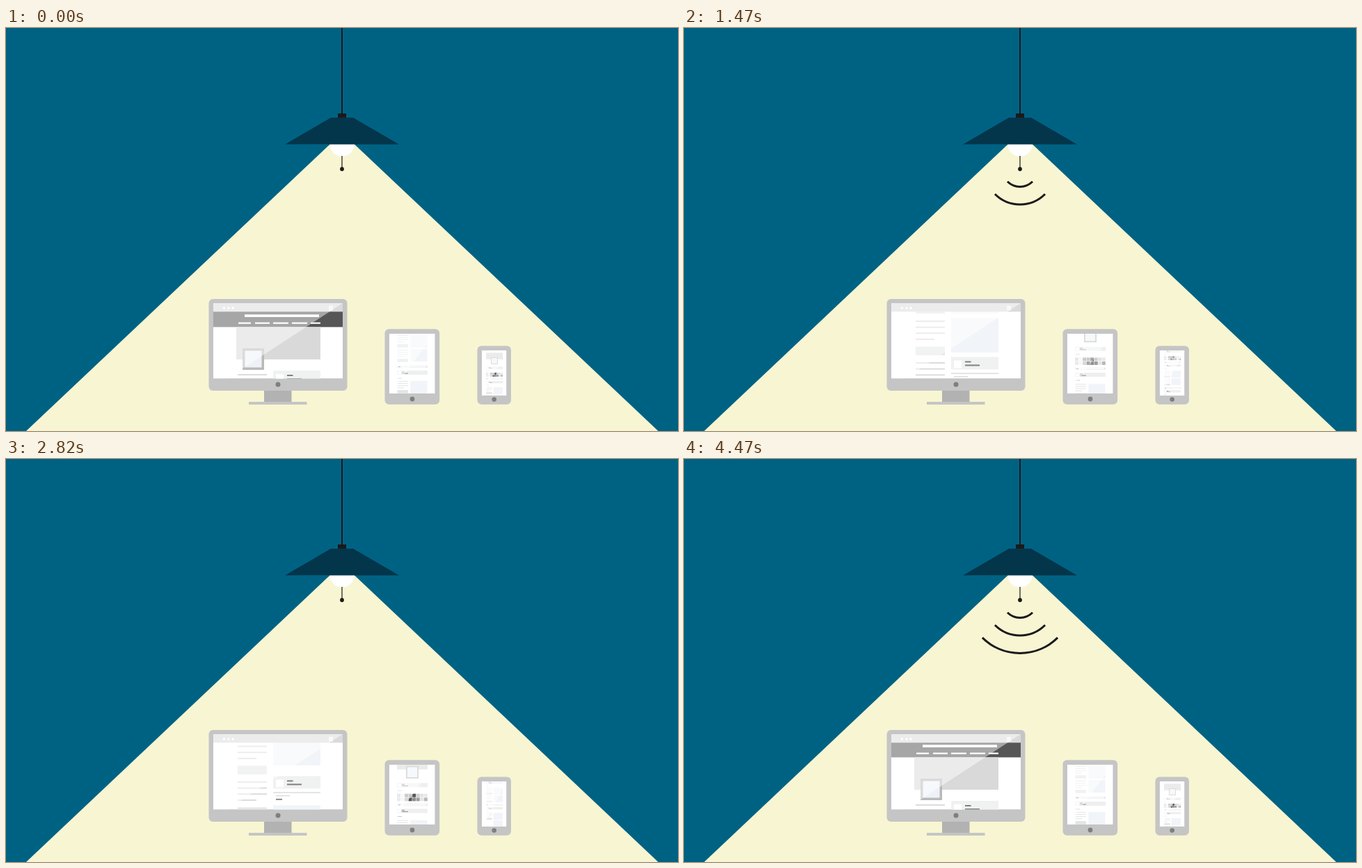
An HTML page with a canvas that plays this animation: 966x580 px, repeating every 4740 ms.

```html
<!DOCTYPE html>
<html lang="en">
<head>
<meta charset="utf-8">
<title>Lamp and devices</title>
<style>
  html, body { margin: 0; width: 100%; height: 100%; overflow: hidden; background: #006283; }
  canvas { display: block; }
</style>
</head>
<body>
<canvas id="stage" width="966" height="580"></canvas>
<script>
const ctx = document.getElementById('stage').getContext('2d');
const LOOP = 4740, STEP = 30, LAST = 149;
const INK = '#1a1a1a', BODY = '#c5c5c5', DARK = '#565656', LINE = '#dcdcdc', PICTURE = '#f1f4f8';
const SWATCHES = ['#b2b2b2', '#f1f3f4', '#9c9c9c', '#9c9c9c', DARK, '#d9d9d9', '#d9d9d9', '#f1f2f2', '#b2b2b2'];
const STRIP = [
  '#d4d4d4', '#f0f0f0', '#9c9c9c', '#9c9c9c', DARK, '#d0d0d0', '#e2e2e2', '#e9e9e9',
  '#d9d9d9', '#eeeeee', '#b2b2b2', DARK, '#8c8c8c', '#9c9c9c', '#e4e4e4', '#b8b8b8'
];

function rect(color, x, y, w, h) {
  ctx.fillStyle = color;
  ctx.fillRect(x, y, w, h);
}

function disc(color, x, y, r) {
  ctx.fillStyle = color;
  ctx.beginPath();
  ctx.arc(x, y, r, 0, 7);
  ctx.fill();
}

function poly(color, ...points) {
  ctx.fillStyle = color;
  ctx.beginPath();
  points.forEach(([x, y]) => ctx.lineTo(x, y));
  ctx.fill();
}

function rounded(color, x, y, w, h, r) {
  ctx.fillStyle = color;
  ctx.beginPath();
  ctx.roundRect(x, y, w, h, r);
  ctx.fill();
}

function cells(colors, columns, x, y, pitchX, pitchY, w, h) {
  colors.forEach((color, i) =>
    rect(color, x + i % columns * pitchX, y + Math.floor(i / columns) * pitchY, w, h));
}

function avatar(x, y, size, border) {
  rect('#b9b9b9', x, y, size, size);
  rect('#eef2f7', x + border, y + border, size - 2 * border, size - 2 * border);
}

// Clips a screen, draws its content and lays the diagonal shine over it.
function screen(x, y, w, h, shineX, content) {
  ctx.save();
  ctx.beginPath();
  ctx.rect(x, y, w, h);
  ctx.clip();
  rect('#fff', x, y, w, h);
  content();
  poly('rgba(255,255,255,.47)', [x, y], [x + w, y], [shineX, y + h], [x, y + h]);
  ctx.restore();
}

function lamp(waves) {
  rect('#006283', 0, 0, 966, 580);
  poly('#f8f5d2', [466, 167], [500.5, 167], [937.5, 580], [29, 580]);
  rect(INK, 482, 0, 2, 124);
  rect(INK, 477, 123, 12, 7);
  disc('#fff', 483, 167, 17.8);
  poly('#03354b', [467, 129], [499, 129], [565, 167.5], [401, 167.5]);
  poly('#006283', [401, 167.5], [465.5, 167.5], [464, 169]);
  rect(INK, 482.4, 184, 1.2, 19);
  disc(INK, 483, 203, 2.9);
  ctx.strokeStyle = INK;
  ctx.lineWidth = 3;
  for (let i = 1; i <= waves; i++) {
    ctx.beginPath();
    ctx.arc(483, 203, 25.5 * i, Math.PI / 4, Math.PI * 3 / 4);
    ctx.stroke();
  }
}

function textLines(y, count = 4) {
  for (let i = 0; i < count; i++) rect(LINE, 333, y + i * 8.7, i === 3 ? 27 : 42, 2);
}

function wideCard(y) {
  rect('#f0f1f1', 384, y, 68, 18);
  rect('#fff', 388, y + 5, 11, 11);
  rect('#808080', 404, y + 6, 8.5, 2);
  rect('#808080', 404, y + 11, 21, 2);
  rect(LINE, 384, y + 23, 68, 1.5);
  rect(LINE, 388, y + 27.5, 20, 1.5);
  rect('#8c8c8c', 388, y + 32.5, 9, 2);
}

function widePage() {
  rect(DARK, 298, 408, 186, 22.4);
  rect('#fff', 343, 412.3, 107, 3.7);
  [[334, 18], [358, 21], [384, 22], [411, 22], [438, 14]]
    .forEach(([x, w]) => rect('#fff', x, 423.6, w, 2.2));
  rect('#d9d9d9', 331, 430.4, 121, 46.6);
  avatar(340, 461, 31, 3.5);

  textLines(498);
  cells(SWATCHES, 3, 333, 550, 15.5, 14.6, 14, 13.7);
  textLines(602.5);
  for (let y = 641; y < 960; y += 60) {
    rect('#e4e7e7', 333, y, 42, 12.5);
    textLines(y + 22.5);
  }

  [493, 562, 716, 896].forEach(wideCard);
  [604, 660, 831, 938].forEach(y => rect(PICTURE, 384, y, 68, 49.5));
  cells(SWATCHES, 3, 384, 757, 23.1, 22.3, 20.6, 20.5);
}

function monitor(scroll) {
  rect('#b2b2b2', 371, 521, 39.5, 18);
  rect(BODY, 349, 538, 83.5, 4);
  rounded(BODY, 291.5, 390, 199, 132, 6);
  disc('#7f7f7f', 391, 513, 3.5);
  screen(298, 396, 186, 108.5, 318, () => {
    ctx.translate(0, -scroll);
    widePage();
    ctx.translate(0, scroll);
    rect('#dadada', 298, 396, 186, 12.3);
    [313.5, 320, 326].forEach(x => disc('#fff', x, 403, 1.7));
    [400, 402.4, 404.8].forEach(y => rect('#fff', 464, y, 6, 1.5));
  });
}

function narrowCard(y) {
  rect('#eeefef', 562, y, 44, 6);
  rect('#fff', 563.5, y + 1.5, 4, 3.5);
  rect('#8c8c8c', 569, y + 1.6, 4, 1);
  rect('#8c8c8c', 569, y + 3.6, 9, 1);
  rect('#c8c8c8', 563, y + 10.5, 6, 1);
}

function narrowRow(y) {
  rect('#e8e9e9', 562, y, 44, 3);
  rect('#fff', 567, y + 0.8, 37, 1.4);
  rect('#8c8c8c', 564, y + 1, 3, 1);
}

function narrowPage(withHeader) {
  if (withHeader) {
    rect(DARK, 551, 440.5, 66, 7.7);
    rect('#fff', 566, 442.3, 39, 1.4);
    for (let i = 0; i < 5; i++) rect('#fff', 562.5 + i * 9, 445.7, 7, 1);
  }
  rect('#d9d9d9', 562, 448, 44, 17);
  avatar(575, 460, 18, 1.8);
  [484.5, 521.7, 589].forEach(narrowCard);
  cells(STRIP, 8, 562, 500, 5.55, 5.6, 5, 5);
  [514.5, 582].forEach(narrowRow);
  [538, 558, 604, 624].forEach(y => rect(PICTURE, 581.5, y, 24, 18));
  for (const y of [538, 559, 604]) {
    for (let i = 0; i < 4; i++) rect('#e4e4e4', 562.5, y + i * 3.1, i === 3 ? 10 : 15.5, 1);
    rect('#e2e5e5', 562.5, y + 13.2, 15.5, 4.5);
  }
}

function tablet(scroll) {
  rounded(BODY, 544.5, 433.3, 78.7, 108.5, 6);
  disc('#7f7f7f', 584, 534, 3.4);
  screen(551, 440, 65.7, 86, 552, () => {
    ctx.translate(0, -scroll);
    narrowPage(true);
    ctx.translate(0, scroll);
  });
}

function phone(scroll) {
  rounded(BODY, 677.5, 457.5, 48.5, 84.3, 6);
  disc('#7f7f7f', 701.7, 534.6, 3.3);
  screen(684, 464, 35.5, 65, 686, () => {
    ctx.save();
    ctx.translate(690, 496 - scroll);
    ctx.scale(0.55, 0.55);
    ctx.translate(-562, -500);
    narrowPage(false);
    ctx.restore();
  });
}

function draw(now) {
  const n = Math.min(LAST, Math.floor(now % LOOP / STEP));
  lamp(n ? Math.floor((n - 1) % 30 / 7.5) : 0);
  monitor(n ? Math.max(1, Math.min(4.95 * n, 8.74 * (144.3 - n))) : 0);
  tablet(n < 75 ? Math.max(0, 96 - 1.435 * n) : Math.max(0, Math.min(96, 1.52 * (n - 82))));
  phone(Math.min(0.485 * n, 0.8 * (LAST - n)));
}

const start = performance.now();
function tick() {
  draw(performance.now() - start);
  requestAnimationFrame(tick);
}
tick();
</script>
</body>
</html>
```
